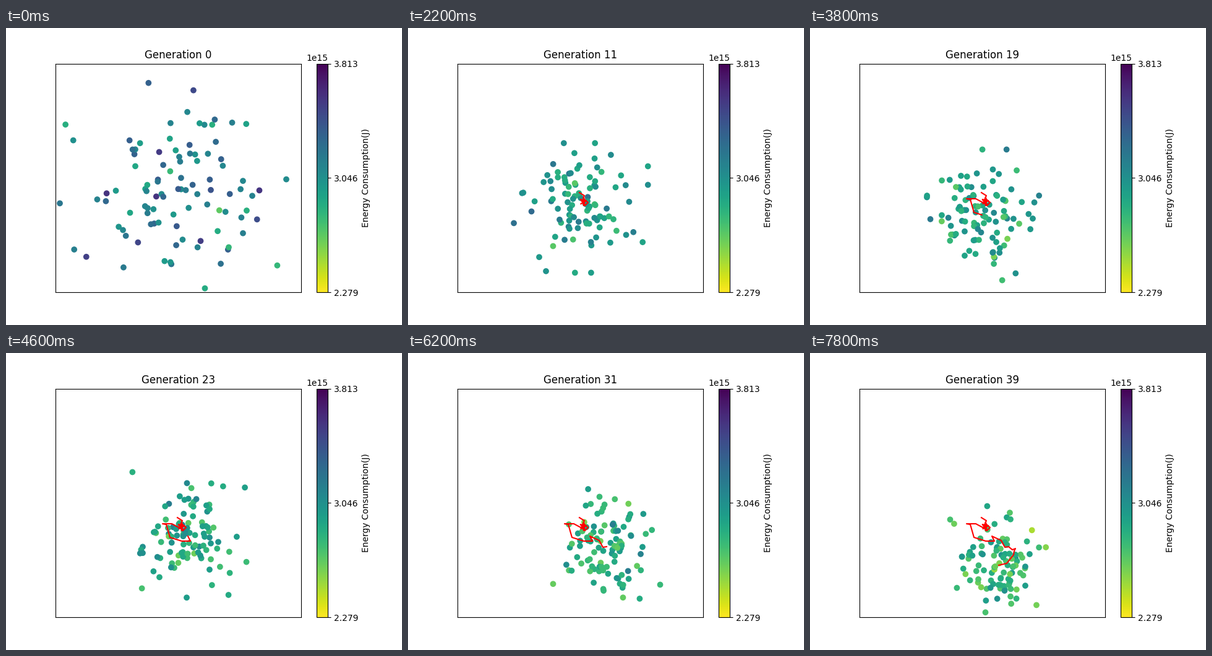
Animation of 640x480 px, one loop 8 s. Source, as a matplotlib script:

```python
import matplotlib.pyplot as plt
import numpy as np
from matplotlib.animation import FuncAnimation
from matplotlib.cm import ScalarMappable
from matplotlib.colors import Normalize

GENERATIONS = 40
POPULATION = 100
LOW, HIGH = 2.279e15, 3.813e15

# Mean position: first steps, a tight knot, then a drift through a few bends
START = [(277, 266), (285, 271), (283, 275), (291, 282), (286, 287),
         (282, 278), (284, 287)]
BENDS = [(14, 268, 276), (15, 253, 276), (16, 259, 277), (17, 265, 298),
         (20, 284, 304), (22, 298, 304), (23, 294, 296), (28, 309, 303),
         (30, 315, 314), (31, 321, 313), (32, 327, 318), (33, 332, 316),
         (34, 330, 320), (36, 329, 326), (38, 318, 340), (39, 305, 343)]


def mean_path():
    knot = np.arange(len(START), BENDS[0][0])
    turn = 2.5 * knot
    loops = np.column_stack([283 + 5 * np.cos(turn), 280 + 6 * np.sin(turn)])
    gens, xs, ys = np.array(BENDS).T
    rest = np.arange(gens[0], GENERATIONS)
    drift = np.column_stack([np.interp(rest, gens, xs),
                             np.interp(rest, gens, ys)])
    return np.vstack([START, loops, drift])


def population(gen):
    """Rows of x, y, energy: a normal cloud that narrows and improves."""
    rng = np.random.default_rng(500 + gen)
    early = np.exp(-gen / 3)
    spread = (47 - 0.4 * gen + 29 * early,
              46 - 0.2 * gen + 28 * early,
              0.13 + 0.07 * early)
    energy = 3.03 - 0.006 * gen + 0.13 * early
    unit = rng.standard_normal((POPULATION, 3))
    unit = (unit - unit.mean(axis=0)) / unit.std(axis=0)
    return (*path[gen], energy) + unit.clip(-2.5, 2.5) * spread


path = mean_path()

fig, ax = plt.subplots(figsize=(6.4, 4.8), dpi=100)
norm = Normalize(LOW, HIGH)
bar = fig.colorbar(ScalarMappable(norm, "viridis_r"), ax=ax,
                   ticks=[LOW, 3.046e15, HIGH])
bar.set_label("Energy Consumption(J)")

# Data units are stage pixels
ax.set(xlim=(80, 476.8), ylim=(427.2, 57.6), xticks=[], yticks=[])
title = ax.set_title("Generation 0")
dots = ax.scatter([], [], c=[], cmap="viridis_r", norm=norm)
trail, = ax.plot([], [], color="red")


def update(gen):
    people = population(gen)
    dots.set_offsets(people[:, :2])
    dots.set_array(people[:, 2] * 1e15)
    trail.set_data(*path[:gen + 1].T)
    title.set_text(f"Generation {gen}")
    return dots, trail, title


anim = FuncAnimation(fig, update, frames=GENERATIONS, interval=200, repeat=True)
plt.show()
```
